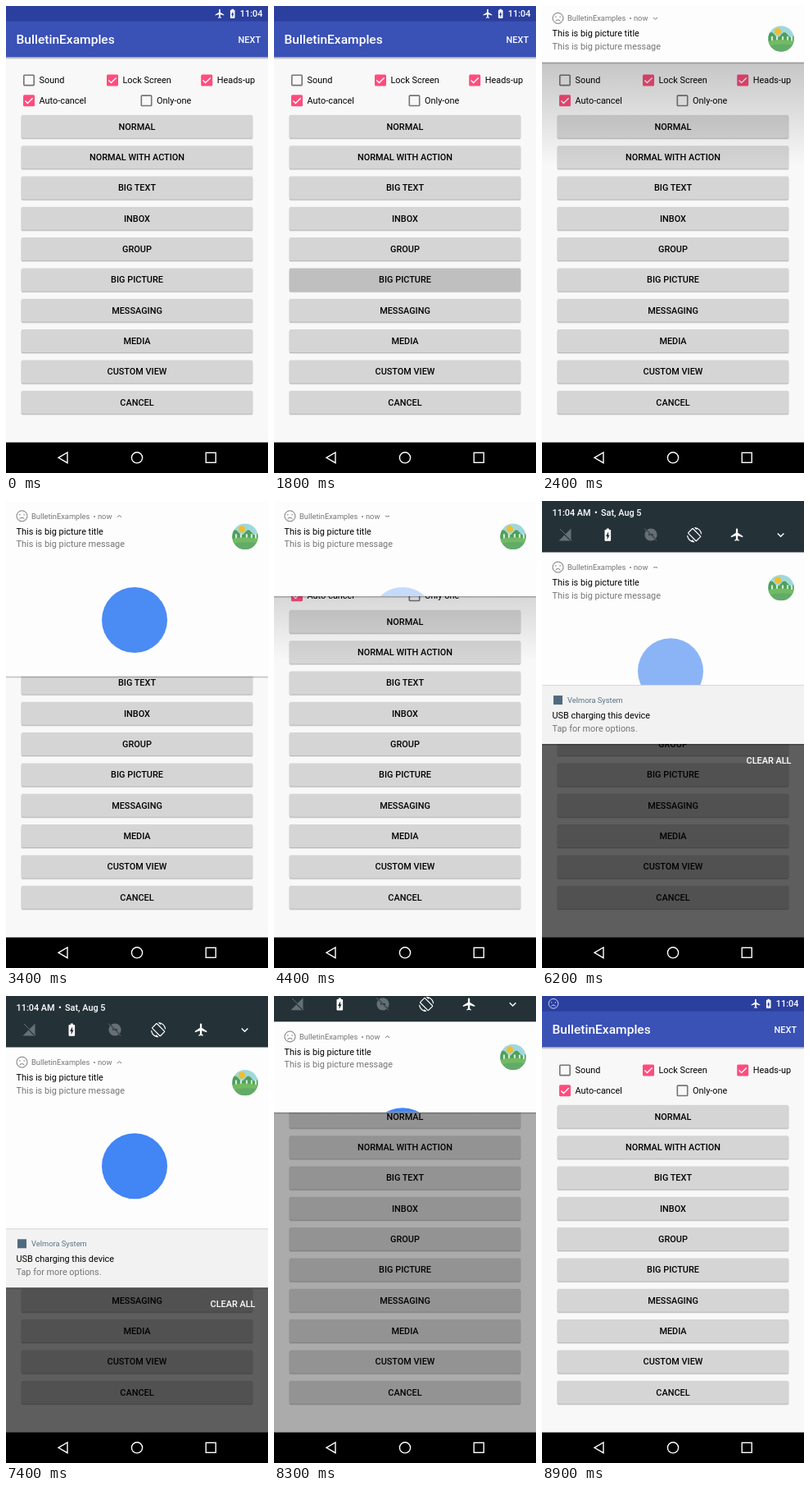
Recreate the animation shown at these times as an HTML page. Size 320 by 569 pixels, loop 9 s.

```html
<!DOCTYPE html>
<html lang="en">
<head>
<meta charset="utf-8">
<title>Notification demo</title>
<style>
  html, body { margin: 0; height: 100%; overflow: hidden; background: #000; }
  svg { display: block; width: 100%; height: 100%; }
  text { font: 10.9px Roboto, sans-serif; white-space: pre; }
  .bold { font-weight: 500; }
  .small { font-size: 9.33px; }
  .grey { fill: #757575; }
  .mid { text-anchor: middle; }
  .end { text-anchor: end; }
  .white { fill: #fff; }
  .line { fill: none; stroke-width: 1.4; }
</style>
</head>
<body>
<svg viewBox="0 0 320 569">
  <defs>
    <linearGradient id="fade" x2="0" y2="1">
      <stop stop-opacity=".33"/><stop offset="1" stop-opacity="0"/>
    </linearGradient>
    <clipPath id="panelClip"><rect id="panelBox" width="320" height="0"/></clipPath>
    <clipPath id="buttonClip"><rect x="18.7" y="319.5" width="282.6" height="28" rx="1.6"/></clipPath>
    <clipPath id="round"><circle r="15.7"/></clipPath>
    <path id="plane" d="M21 16v-2l-8-5V3.5c0-.83-.67-1.5-1.5-1.5S10 2.67 10 3.5V9l-8 5v2l8-2.5V19l-2 1.5V22l3.5-1 3.5 1v-1.5L13 19v-5.5l8 2.5z"/>
    <path id="battery" d="M15.67 4H14V2h-4v2H8.33C7.6 4 7 4.6 7 5.33v15.33C7 21.4 7.6 22 8.33 22h7.33c.74 0 1.34-.6 1.34-1.33V5.33C17 4.6 16.4 4 15.67 4zM11 20v-5.5H9L13 7v5.5h2z"/>
    <path id="rotate" d="M16.48 2.52c3.27 1.55 5.61 4.72 5.97 8.48h1.5C23.44 4.84 18.29 0 12 0l-.66.03 3.81 3.81zm-6.25-.77c-.59-.59-1.54-.59-2.12 0L1.75 8.11c-.59.59-.59 1.54 0 2.12l12.02 12.02c.59.59 1.54.59 2.12 0l6.36-6.36c.59-.59.59-1.54 0-2.12zm4.6 19.44L2.81 9.17l6.36-6.36 12.02 12.02zm-7.31.29C4.25 19.94 1.91 16.76 1.55 13H.05C.56 19.16 5.71 24 12 24l.66-.03-3.81-3.81z"/>
    <g id="sad" fill="none">
      <circle r="6.5"/>
      <path d="M-3 3.6Q0 .2 3 3.6M-2.6-2.4v1.5M2.6-2.4v1.5"/>
    </g>
  </defs>

  <!-- app -->
  <rect width="320" height="569" fill="#f8f8f8"/>
  <rect y="62.3" width="320" height="3" fill="url(#fade)"/>
  <rect y="18" width="320" height="44.3" fill="#3a51b5"/>
  <rect width="320" height="18.7" fill="#2b3f9e"/>
  <text class="white bold" x="12.5" y="46.2" style="font-size:15.56px">BulletinExamples</text>
  <text class="white bold end" x="311" y="44.8">NEXT</text>
  <g class="white">
    <use href="#plane" transform="translate(254.5 2.6) scale(.56)"/>
    <use href="#battery" transform="translate(270 2.6) scale(.56)"/>
    <text class="bold end" x="313.5" y="13.3">11:04</text>
  </g>
  <use id="statusSad" href="#sad" transform="translate(14 9.3) scale(.9)" stroke="#dfe3f5"/>
  <g id="checks"></g>
  <g id="buttons"></g>
  <circle id="ripple" cx="160" cy="333.5" clip-path="url(#buttonClip)"/>

  <rect id="topShade" width="320" height="194.5" fill="url(#fade)"/>
  <rect id="scrim" width="320" height="532"/>
  <text id="clear" class="white bold end" x="304.5">CLEAR ALL</text>

  <!-- notifications -->
  <rect id="edge" width="320" height="2.5" fill="url(#fade)"/>
  <g clip-path="url(#panelClip)">
    <g id="card">
      <rect width="320" height="222" fill="#fdfdfd"/>
      <circle id="picture" cx="157" cy="145" r="40" fill="#4285f4"/>
      <use href="#sad" x="19.5" y="18.3" stroke="#757575"/>
      <text class="small grey" x="31" y="21.9">BulletinExamples</text>
      <text class="small grey" x="106.5" y="21.9">• now</text>
      <path id="chevron" transform="translate(138.5 18.6)" fill="none" stroke="#757575"/>
      <text x="12.5" y="40.8">This is big picture title</text>
      <text class="grey" x="12.5" y="56.3">This is big picture message</text>
      <g transform="translate(292 43.3)" clip-path="url(#round)">
        <rect x="-16" y="-16" width="32" height="32" fill="#9fd8dc"/>
        <circle cx="-4" cy="-9" r="4" fill="#f0bd2c"/>
        <path d="M-16-5q4-6 8 0t8 0 8 0 8 0V8h-32z" fill="#4fa05a"/>
        <path d="M-11 4v-7M-5 3v-6M2 4v-7M8 3v-6M13 4v-7" stroke="#d5ead6" stroke-width="2.2"/>
        <path d="M-16 3Q0-1 16 3V16h-32z" fill="#72bb62"/>
        <path d="M-16 9Q0 5 16 8V16h-32z" fill="#63ab6a"/>
      </g>
    </g>
    <g id="system">
      <rect width="320" height="73" fill="#f2f2f2"/>
      <rect width="320" height="1" fill="#d8d8d8"/>
      <g id="systemText">
        <rect x="14" y="13" width="11" height="11" fill="#4f6a80"/>
        <text class="small" x="31" y="21.9" fill="#5a7484">Velmora System</text>
        <text x="12.5" y="41.2">USB charging this device</text>
        <text class="grey" x="12.5" y="56.7">Tap for more options.</text>
      </g>
    </g>
  </g>

  <!-- quick settings -->
  <g id="header" class="white">
    <rect width="320" height="62.3" fill="#243238"/>
    <text class="bold" x="12.5" y="18">11:04 AM</text>
    <text class="bold" x="64" y="18">•</text>
    <text class="bold" x="72" y="18">Sat, Aug 5</text>
    <g fill="#fff" fill-opacity=".3">
      <path d="M20.5 48.5h15v-15z"/>
      <circle cx="133" cy="41" r="7.6"/>
    </g>
    <path d="M21 34l14 14M126 34l14 14M130 41h6" stroke="#243238" stroke-width="1.5"/>
    <path d="M22 34l14 14M125 33.5l15 15" stroke="#66737a" stroke-width="1"/>
    <use href="#battery" transform="translate(71.2 32) scale(.76)"/>
    <use href="#rotate" transform="translate(177 32) scale(.76)"/>
    <use href="#plane" transform="translate(229.3 32) scale(.76)"/>
    <path d="M287.8 39.4l3.8 3.8 3.8-3.8" class="line" stroke="#fff"/>
  </g>

  <!-- navigation bar -->
  <rect y="531.7" width="320" height="38" fill="#000"/>
  <g class="line" stroke="#fff">
    <path d="M64 550.3l11-6.4v12.8z"/>
    <circle cx="160" cy="550.3" r="6.6"/>
    <rect x="244.2" y="544.3" width="12" height="12"/>
  </g>
</svg>

<script>
const LOOP = 9000, STEP = 100;
const BAR = 62.3, SMALL = 72, BIG = 221, FULL = BAR + BIG + SMALL;
const $ = id => document.getElementById(id);
const set = (id, attrs) => {
  for (const name in attrs) $(id).setAttribute(name, attrs[name]);
};
const move = (id, y) => set(id, { transform: `translate(0 ${y})` });

// Cubic bezier (x1, 0, .2, 1) solved by bisection
function curve(x1, t, from, to) {
  const x = Math.min(1, Math.max(0, (t - from) / (to - from)));
  let lo = 0, hi = 1, s = x;
  for (let i = 0; i < 24; i++) {
    s = (lo + hi) / 2;
    const r = 1 - s;
    if (3 * r * r * s * x1 + .6 * r * s * s + s ** 3 < x) lo = s; else hi = s;
  }
  return x === 0 || x === 1 ? x : 3 * (1 - s) * s * s + s ** 3;
}
const ease = (t, from, to) => curve(.4, t, from, to);
const settle = (t, from, to) => curve(0, t, from, to);

const check = (x, y, label, on) => `<g transform="translate(${x} ${y})">` + (on
  ? `<rect x="-7" y="-7" width="14" height="14" rx="1.5" fill="#ff4d7d"/>
     <path d="M-4.6.2l3 3 6.2-6.2" class="line" stroke="#fff"/>`
  : `<rect x="-6.2" y="-6.2" width="12.4" height="12.4" rx=".8" class="line" stroke="#757575" style="stroke-width:1.6"/>`)
  + `<text x="12.5" y="4">${label}</text></g>`;

$('checks').innerHTML = check(28, 90.4, 'Sound') + check(130, 90.4, 'Lock Screen', true)
  + check(245.2, 90.4, 'Heads-up', true) + check(28, 115.3, 'Auto-cancel', true)
  + check(171.5, 115.3, 'Only-one');

$('buttons').innerHTML = ['NORMAL', 'NORMAL WITH ACTION', 'BIG TEXT', 'INBOX', 'GROUP',
  'BIG PICTURE', 'MESSAGING', 'MEDIA', 'CUSTOM VIEW', 'CANCEL'].map((label, i) => {
  const box = (dy, fill) =>
    `<rect x="18.7" y="${dy - 14}" width="282.6" height="28" rx="1.6" ${fill}/>`;
  return `<g transform="translate(0 ${146.8 + i * 37.33})">`
    + box(1.7, 'fill-opacity=".1"') + box(1, 'fill-opacity=".17"') + box(0, 'fill="#d5d5d5"')
    + `<text class="bold mid" x="160" y="3.9">${label}</text></g>`;
}).join('');

function expansion(t, open) {
  if (t < 4000) return ease(t, 2975, 3560);
  if (t < 4800) return 1 - ease(t, 4238, 4598);
  if (t < 6000) return open;
  if (t < 6800) return 1 - ease(t, 6088, 6448);
  return ease(t, 6875, 7400);
}

function draw(t) {
  const pinned = t < 4800, closing = t >= 8000;
  const reach = closing ? FULL * (1 - ease(t, 8040, 8700))
    : SMALL + (FULL - SMALL) * ease(t, 4822, 5372);
  const open = Math.min(1, closing ? reach / (BAR + BIG) : (reach - SMALL) / (BAR + BIG - SMALL));
  const shown = settle(t, 1900, 2600);
  const grown = expansion(t, open);
  const faded = !pinned && t < 6000 ? ease(t, 5030, 5390) : grown;

  const top = pinned ? -SMALL * (1 - shown) : BAR * open;
  const bottom = top + SMALL + (BIG - SMALL) * grown;
  const edge = pinned ? bottom : Math.min(reach, bottom + SMALL);

  set('ripple', {
    r: 20 + 130 * ease(t, 1450, 1800),
    opacity: t < 1500 ? 0 : .14 * (1 - ease(t, 1700, 2100))
  });
  set('statusSad', { opacity: t < 1900 ? 0 : 1 });
  set('topShade', { opacity: closing ? 0 : shown * (1 - open) });
  set('scrim', { opacity: .62 * open });
  set('clear', {
    y: edge + 23.5,
    opacity: closing ? 1 - ease(t, 8040, 8240) : ease(t, 5200, 5500)
  });
  set('panelBox', { height: Math.max(0, edge) });
  set('edge', { y: edge, opacity: edge > 0 ? 1 : 0 });
  set('picture', { opacity: faded });
  const bend = 1.2 * (1 - 2 * faded);
  set('chevron', { d: `M-2.5 ${-bend}L0 ${bend} 2.5 ${-bend}` });
  set('systemText', { opacity: ease(t, 5100, 5400) });
  move('card', top);
  move('system', bottom);
  move('header', -BAR * (1 - open));
}

const start = performance.now();
function tick() {
  const t = (performance.now() - start) % LOOP;
  draw(Math.floor(t / STEP) * STEP);
  requestAnimationFrame(tick);
}
tick();
</script>
</body>
</html>
```
